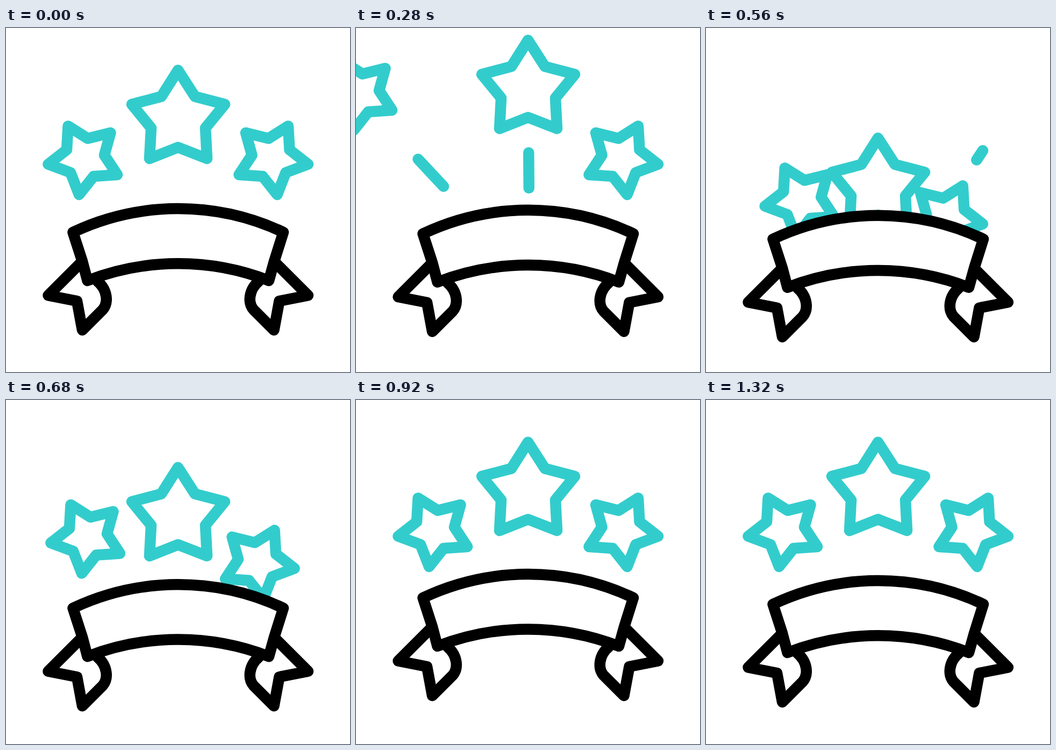
Write an HTML page that moves like this. It is 640x640 px and loops after 1480 ms.

```html
<!DOCTYPE html>
<html lang="en">
<head>
<meta charset="utf-8">
<title>Ribbon and stars</title>
<style>
  html, body { margin: 0; width: 100%; height: 100%; overflow: hidden; background: #fff; }
  svg { display: block; width: 100vw; height: 100vh; }
</style>
</head>
<body>
<svg viewBox="0 0 640 640" fill="none" stroke-width="20.5" stroke-linecap="round" stroke-linejoin="round">
  <defs>
    <clipPath id="above"><path d="M0 -40H640V425H512Q320 350 128 425H0Z"/></clipPath>
    <path id="big" d="M320 78.5L351.5 127.5L407 142L371 186L374 243L320 222L267 243L270 186L234 142L289 127.5Z"/>
    <path id="small" d="M115.5 182.5L152 205.5L194.500 195L183 236.500L207 273L163 276L136 310L120 269L78.500 253.500L113 226.500Z"/>
    <g id="mirrored"><use href="#small" transform="matrix(-1 0 0 1 640.5 0)"/></g>
    <path id="tail" d="M142 434L78.500 497.500L132 508L142 562L180 524C191 511 189 487 170 471"/>
  </defs>
  <g stroke="#3cc" id="teal">
    <g id="trails"></g>
    <g id="leaving"></g>
    <g id="rising" clip-path="url(#above)"></g>
  </g>
  <g id="ribbon" stroke="#000">
    <use href="#tail"/>
    <use href="#tail" transform="matrix(-1 0 0 1 640.5 0)"/>
    <path fill="#fff" d="M124.500 380A458.500 458.500 0 0 1 516 380L499 434L489 470A466 466 0 0 0 151.500 470L142 434Z"/>
  </g>
</svg>
<script>
const LOOP = 1480, STEP = 40;
const $ = id => document.getElementById(id);
const clamp = x => Math.min(1, Math.max(0, x));
const smooth = x => x * x * (3 - 2 * x);
const mix = (a, b, p) => a + (b - a) * p;

function add(parent, tag, attrs) {
  const el = document.createElementNS("http://www.w3.org/2000/svg", tag);
  for (const k in attrs) el.setAttribute(k, attrs[k]);
  return parent.appendChild(el);
}

// out: launch direction, start time and power; back: sideways ratio, rate and arrival time
// trail: from, to, start time, durations of the head and of the end
const stars = [
  { shape: "small", out: [-0.0692, -0.0593, 120], back: [0.4, 0.1074, 730],
    trail: [[220, 356], [115.5, 244], 120, 160, 293] },
  { shape: "big", out: [0, -0.0780, 200], back: [0, 0.1011, 809],
    trail: [[322, 337], [321, 197], 200, 160, 286] },
  { shape: "mirrored", out: [0.0692, -0.0609, 280], back: [-0.425, 0.0651, 915],
    trail: [[426, 362], [515, 228], 280, 235, 322] }
];

for (const s of stars) {
  s.line = add($("trails"), "line", {});
  s.gone = add($("leaving"), "use", { href: "#" + s.shape });
  s.next = add($("rising"), "use", { href: "#" + s.shape });
}

const move = (el, x, y) =>
  el.setAttribute("transform", `translate(${x.toFixed(2)} ${y.toFixed(2)})`);

function ribbonY(t) {
  const A = 12.7;
  if (t < 560) return A * smooth(clamp((t - 160) / 400));
  if (t < 960) return mix(A, -A, smooth((t - 560) / 400));
  return -A * (1 - smooth(clamp((t - 960) / 360)));
}

function drawTrail(el, [from, to, start, headMs, endMs], t) {
  const h = clamp((t - start) / headMs);
  const head = h * (2 - h);
  const end = clamp((t - start) / endMs);
  el.style.display = head > end ? "" : "none";
  const at = (i, p) => mix(from[i], to[i], p).toFixed(2);
  el.setAttribute("x1", at(0, end));
  el.setAttribute("y1", at(1, end));
  el.setAttribute("x2", at(0, head));
  el.setAttribute("y2", at(1, head));
}

function draw(t) {
  move($("ribbon"), 0, ribbonY(t));
  for (const s of stars) {
    const [vx, vy, start] = s.out;
    const d = Math.max(0, t - start) ** 1.5;
    move(s.gone, vx * d, vy * d);
    const [ratio, rate, arrive] = s.back;
    const y = (rate * Math.max(0, arrive - t)) ** 1.5;
    move(s.next, ratio * y, y);
    drawTrail(s.line, s.trail, t);
  }
}

const t0 = performance.now();
function tick() {
  const t = (performance.now() - t0) % LOOP;
  draw(Math.floor(t / STEP) * STEP);
  requestAnimationFrame(tick);
}
tick();
</script>
</body>
</html>
```
